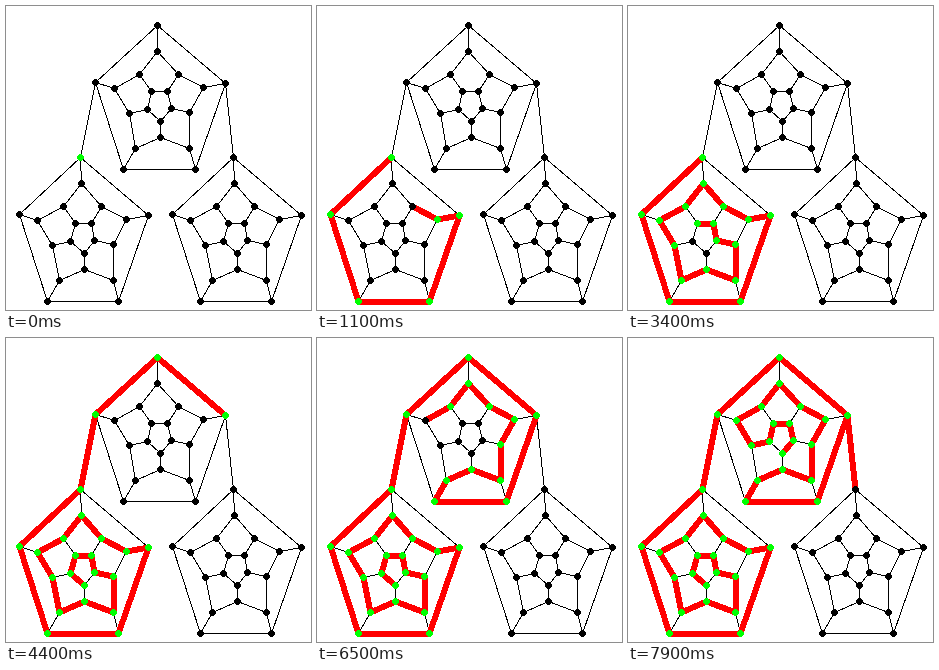
An HTML page for the animation above (8000 ms loop, 305x304 px).

```html
<!DOCTYPE html>
<html lang="en">
<head>
<meta charset="utf-8">
<title>Path through linked dodecahedron graphs</title>
<style>
  html, body { margin: 0; width: 100%; height: 100%; overflow: hidden; background: #fff; }
  svg { display: block; width: 305px; height: 304px; shape-rendering: crispEdges; }
  .edge { stroke: #000; stroke-width: 1; }
  .path { stroke: #f00; stroke-width: 6; stroke-linecap: round; }
</style>
</head>
<body>
<svg id="stage" viewBox="0 0 305 304"></svg>
<script>
(() => {
  const STEP = 100, STEPS = 80;
  const SIZE = 20, LOWER_LEFT = 0, UPPER = SIZE, LOWER_RIGHT = 2 * SIZE;
  const svg = document.getElementById('stage');

  // Corners of one graph, each ring clockwise from its top.
  const outer = [[74.5, 151], [142.5, 209], [112.5, 295], [41, 295], [13, 208]];
  const middle = [[75, 177], [95.5, 200], [120.5, 213], [107, 238], [107, 274],
                  [78, 263], [53, 274], [46.5, 239], [31.5, 214], [57, 200]];
  const inner = [[85, 217], [88.5, 234], [78, 247], [64.5, 235], [69, 217]];
  const shape = [...outer, ...middle, ...inner];

  const nodes = [[0, 0], [76.5, -132], [153, 0]].flatMap(([dx, dy]) =>
    shape.map(([x, y]) => [Math.floor(x + dx) + 0.5, y + dy + 0.5]));

  // Node numbers from a to b, counting up or down.
  const span = (a, b) =>
    Array.from({ length: Math.abs(b - a) + 1 }, (_, i) => a + i * Math.sign(b - a));
  const ring = (a, b) => span(a, b).map(n => [n, n < b ? n + 1 : a]);
  const spokes = span(0, 4).flatMap(i => [[i, 5 + 2 * i], [6 + 2 * i, 15 + i]]);
  const graph = [...ring(0, 4), ...ring(5, 14), ...ring(15, 19), ...spokes];
  const edges = [LOWER_LEFT, UPPER, LOWER_RIGHT].flatMap(base =>
    graph.map(([p, q]) => [base + p, base + q]));
  edges.push([LOWER_LEFT, UPPER + 4], [UPPER + 1, LOWER_RIGHT]);

  // The walk, as chains of nodes in drawing order.
  const firstTour = [0, ...span(4, 1), ...span(7, 5), ...span(14, 8),
                     16, 15, ...span(19, 17)];
  const secondTour = [4, ...span(0, 3), ...span(11, 5), ...span(14, 12),
                      18, 19, ...span(15, 17)];
  const chains = [
    firstTour,
    [LOWER_LEFT, ...secondTour.map(n => UPPER + n)],
    [UPPER + 1, LOWER_RIGHT]
  ];
  const walk = chains.flatMap(chain => chain.slice(1).map((n, i) => [chain[i], n]));

  function add(tag, attrs) {
    const el = document.createElementNS('http://www.w3.org/2000/svg', tag);
    for (const key in attrs) el.setAttribute(key, attrs[key]);
    return svg.appendChild(el);
  }

  function line([p, q], cls) {
    const [x1, y1] = nodes[p], [x2, y2] = nodes[q];
    return add('line', { x1, y1, x2, y2, class: cls });
  }

  edges.forEach(e => line(e, 'edge'));
  const strokes = walk.map(e => line(e, 'path'));
  const dots = nodes.map(([cx, cy]) => add('circle', { cx, cy, r: 3.4 }));

  // Each edge takes two steps: the line appears, then its end node lights up.
  const litAt = nodes.map(() => Infinity);
  litAt[0] = 0;
  walk.forEach(([, end], i) => { litAt[end] = 2 * i + 2; });

  let shown = -1;
  function draw(now) {
    const step = Math.floor(now / STEP) % STEPS;
    if (step === shown) return;
    shown = step;
    strokes.forEach((s, i) => { s.style.display = step > 2 * i ? '' : 'none'; });
    dots.forEach((d, i) => d.setAttribute('fill', step >= litAt[i] ? '#0f0' : '#000'));
  }

  let start = null;
  function tick(now) {
    start ??= now;
    draw(now - start);
    requestAnimationFrame(tick);
  }
  draw(0);
  requestAnimationFrame(tick);
})();
</script>
</body>
</html>
```
